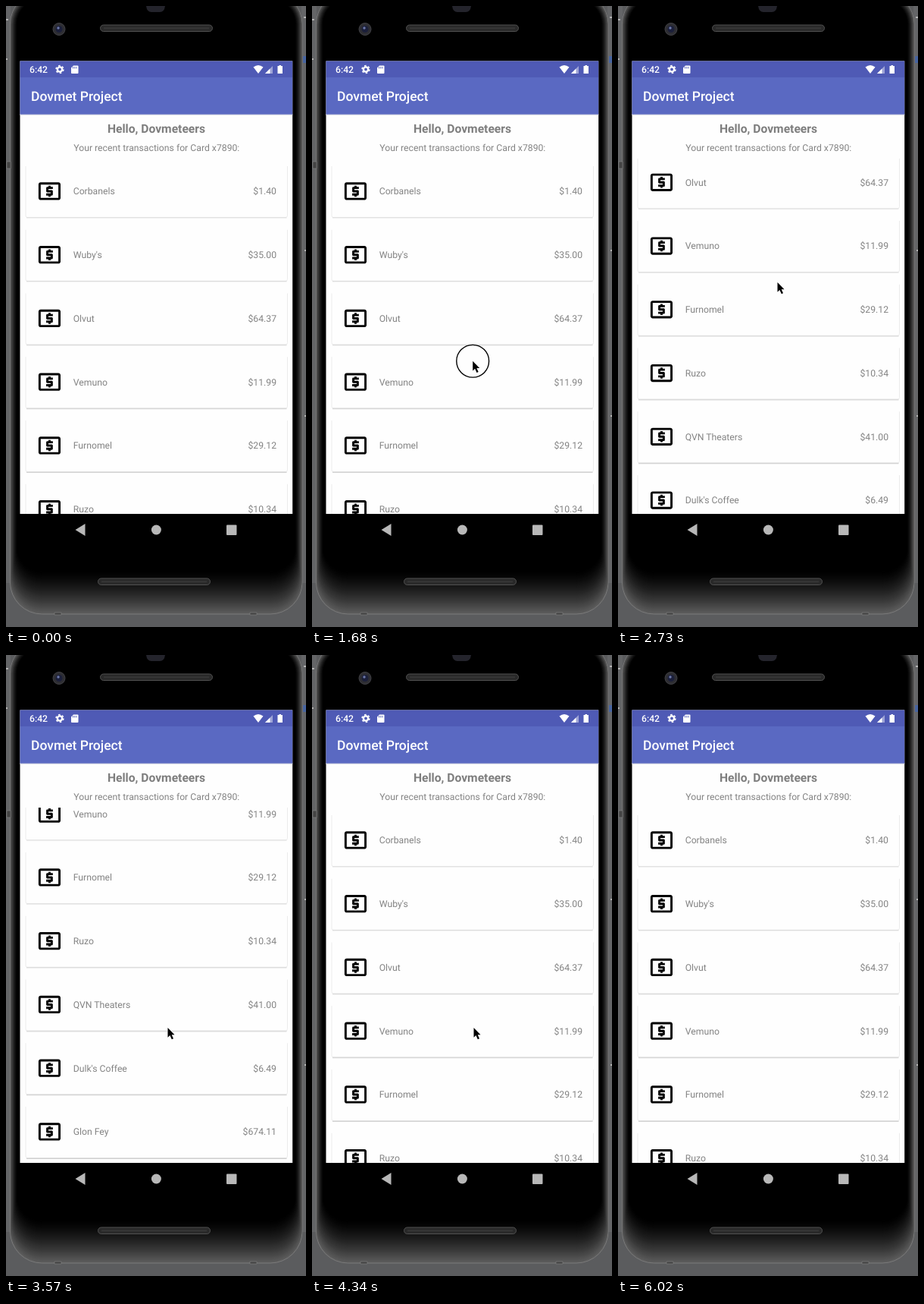
These frames come from a looping animation (396 by 818 pixels, 6090 ms). An HTML page:

```html
<!DOCTYPE html>
<html lang="en">
<head>
<meta charset="utf-8">
<title>Transactions</title>
<style>
  html, body { margin: 0; width: 100%; height: 100%; overflow: hidden; background: #5b5c5e; }
  svg { display: block; width: 396px; height: 818px; font-family: Roboto, sans-serif; text-rendering: geometricPrecision; }
  .body { font-size: 12.22px; fill: #838383; }
  .hello { font-size: 15.65px; font-weight: 700; fill: #7e7e7e; }
  .title { font-size: 17.5px; font-weight: 500; fill: #fff; }
  .clock { font-size: 12.2px; font-weight: 500; fill: #fff; }
</style>
</head>
<body>
<svg viewBox="0 0 396 818">
  <defs>
    <clipPath id="window"><rect x="19" y="201" width="359" height="468"/></clipPath>
    <path id="cash" fill-rule="evenodd" d="M11 17h2v-1h1c.55 0 1-.45 1-1v-3c0-.55-.45-1-1-1h-3v-1h4V8h-2V7h-2v1h-1c-.55 0-1 .45-1 1v3c0 .55.45 1 1 1h3v1H9v2h2zM20 4H4c-1.1 0-2 .9-2 2v12c0 1.1.9 2 2 2h16c1.1 0 2-.9 2-2V6c0-1.1-.9-2-2-2zm0 14H4V6h16z"/>
    <g id="speaker">
      <rect x=".5" y=".5" width="148" height="8.5" rx="4.2" fill="#292929" stroke="#505050"/>
      <path d="M5 4.8H144" stroke="#363636" stroke-width="2"/>
    </g>
  </defs>

  <!-- desktop behind the phone -->
  <rect width="396" height="818" fill="#5b5c5e"/>
  <path d="M0 0H6V760H0zM390 0H396V760H390z" fill="#646567"/>
  <path d="M392 66H396V75H392z" fill="#4764a0"/>
  <path d="M0 18H3M0 70H2M393 15H396M394 322H396M394 540H396" stroke="#b4b4b4" stroke-width="2"/>

  <!-- phone -->
  <g id="shell"></g>
  <path d="M1 205H6V214H1zM64 799H73V802H64zM322 799H331V802H322z" fill="#444" stroke="#858585" stroke-width=".6"/>
  <path d="M185 0H210Q209 8 203 8H192Q186 8 185 0z" fill="#24242c"/>
  <circle cx="70" cy="30.5" r="8" fill="#2e2e33" stroke="#424246"/>
  <circle cx="70" cy="30.5" r="4.5" fill="#1b1f3a"/>
  <circle cx="69" cy="29" r="1.7" fill="#6c78aa"/>
  <use href="#speaker" x="124" y="24.5"/>
  <use href="#speaker" x="121" y="753.5"/>
  <g fill="#b8b8b8">
    <path d="M91.500 690L104.500 682V698z"/>
    <circle cx="198.400" cy="690" r="6.5"/>
    <rect x="291" y="683.5" width="13.5" height="13.5" rx="1"/>
  </g>

  <!-- screen -->
  <rect x="18.500" y="72.500" width="359.700" height="596.500" fill="#fefefe"/>
  <g clip-path="url(#window)">
    <g id="list"></g>
    <path id="glow" d="M19 0H378V14A570 570 0 0 1 19 14z" fill="#5c6bc0" fill-opacity=".13"/>
  </g>
  <rect x="18.500" y="142" width="359.700" height="2" fill="#d9dbe6"/>
  <rect x="18.500" y="94" width="359.700" height="48.700" fill="#5a69c2"/>
  <rect x="18.500" y="72.500" width="359.700" height="21.500" fill="#4f5ab5"/>
  <text class="clock" x="31" y="88.300">6:42</text>
  <g fill="#fff">
    <circle cx="71" cy="83.500" r="3.100" fill="none" stroke="#fff" stroke-width="2.400"/>
    <circle cx="71" cy="83.500" r="4.900" fill="none" stroke="#fff" stroke-width="1.600" stroke-dasharray="2.566"/>
    <path d="M89 78.500H94.500Q95.500 78.500 95.500 79.500V88Q95.500 89 94.500 89H87Q86 89 86 88V81.500z"/>
    <path d="M88.500 80V82.500M90.700 80V82.500M92.900 80V82.500" stroke="#4f5ab5" stroke-width=".9"/>
    <path d="M326.500 80.500Q333 75.500 339.500 80.500L333 89z"/>
    <path d="M342 89L352 79V89z" opacity=".45"/>
    <path d="M342 89L348.500 82.500V89z"/>
    <path d="M360.500 78H363V79H365V89H358.500V79H360.500z"/>
  </g>
  <text class="title" x="33" y="125.300">Dovmet Project</text>
  <text class="hello" x="198.500" y="166.500" text-anchor="middle">Hello, Dovmeteers</text>
  <text class="body" x="198.800" y="191" text-anchor="middle">Your recent transactions for Card x7890:</text>

  <circle id="press" r="21.400" fill="none" stroke="#000" stroke-width="1.400"/>
  <path id="cursor" d="M0 0V12.800L2.900 10.100 5.300 15.300 7.500 14.300 5.200 9.300H9z" stroke="#fff" stroke-width="1.300" paint-order="stroke"/>
</svg>

<script>
const LOOP = 6090, STEP = 70, PITCH = 83.75, MAX_SCROLL = 286;
const $ = id => document.getElementById(id);
const show = (node, on) => node.setAttribute("visibility", on ? "visible" : "hidden");

// Smooth progress from 0 to 1 between two times.
function ease(t, from, to) {
  const u = Math.min(1, Math.max(0, (t - from) / (to - from)));
  return u * u * (3 - 2 * u);
}

// Nested outlines shade the bezel: narrow at the sides, deep at the chin.
const RINGS = 28;
$("shell").innerHTML = Array.from({ length: RINGS + 1 }, (_, i) => {
  const u = i / RINGS, side = 5.5 + 9.5 * u, grey = 92 * (1 - u) ** 1.4;
  return `<rect x="${side}" y="${-18 + 9 * u}" width="${396.5 - 2 * side}" height="${819 - 65 * u}"
    rx="${42 - 9 * u}" fill="rgb(${grey},${grey},${grey})" ${i ? "" : 'stroke="#7a7a7a"'}/>`;
}).join("");

const purchases = [
  ["Corbanels", "$1.40"], ["Wuby's", "$35.00"], ["Olvut", "$64.37"],
  ["Vemuno", "$11.99"], ["Furnomel", "$29.12"], ["Ruzo", "$10.34"],
  ["QVN Theaters", "$41.00"], ["Dulk's Coffee", "$6.49"], ["Glon Fey", "$674.11"]
];
$("list").innerHTML = purchases.map(([shop, price], i) => `
  <g transform="translate(0 ${i * PITCH})">
    <path d="M26 211V276Q26 278.500 28 278.500H369Q371.500 278.500 371.500 276V211" fill="none" stroke="#ececec"/>
    <path d="M27 278.700H370.500" stroke="#e0e0e0"/>
    <path class="shade" d="M27 279.400H370.500" stroke="#d2d2d2" stroke-width="1.200"/>
    <use href="#cash" transform="translate(40 226.500) scale(1.455)"/>
    <text class="body" x="88.700" y="248.300">${shop}</text>
    <text class="body" x="357" y="248.300" text-anchor="end">${price}</text>
  </g>`).join("");
const shades = [...document.querySelectorAll(".shade")];

// Pointer moves: enter, drift, drag up, drag down, leave.
const ENTER = 140, LEAVE = 4970;
const moves = [
  { from: ENTER, to: 490, x: 210.5, y: 539.5 },
  { from: 700, to: 1260, x: 213.5, y: 549 },
  { from: 1550, to: 1833, x: 210.5, y: 364, drag: true },
  { from: 3290, to: 3570, x: 213.5, y: 491, drag: true },
  { from: 4690, to: LEAVE, x: 175, y: 812 }
];

function pointerAt(t) {
  let x = 234, y = 830;
  for (const move of moves) {
    const k = ease(t, move.from, move.to);
    x += (move.x - x) * k;
    y += (move.y - y) * k;
  }
  return `translate(${x} ${y})`;
}

function draw(t) {
  const scroll = MAX_SCROLL * (ease(t, 2335, 3010) - ease(t, 3660, 3930));
  $("list").setAttribute("transform", `translate(0 ${-scroll})`);
  // Card shadows deepen towards the bottom of the screen.
  shades.forEach((line, i) => {
    const depth = (78 + i * PITCH - scroll) / 450;
    line.setAttribute("opacity", Math.max(0, Math.min(1, depth)));
  });

  $("glow").setAttribute("transform", `translate(0 201) scale(1 ${ease(t, 3880, 3990)})`);
  $("glow").setAttribute("opacity", 1 - ease(t, 3990, 4340));

  const place = pointerAt(t);
  $("cursor").setAttribute("transform", place);
  $("press").setAttribute("transform", place);
  show($("cursor"), t >= ENTER && t < LEAVE);
  show($("press"), moves.some(m => m.drag && t >= m.from - STEP && t < m.to - STEP / 5));
}

const start = performance.now();
function tick() {
  const t = (performance.now() - start) % LOOP;
  draw(Math.floor(t / STEP) * STEP);
  requestAnimationFrame(tick);
}
tick();
</script>
</body>
</html>
```
